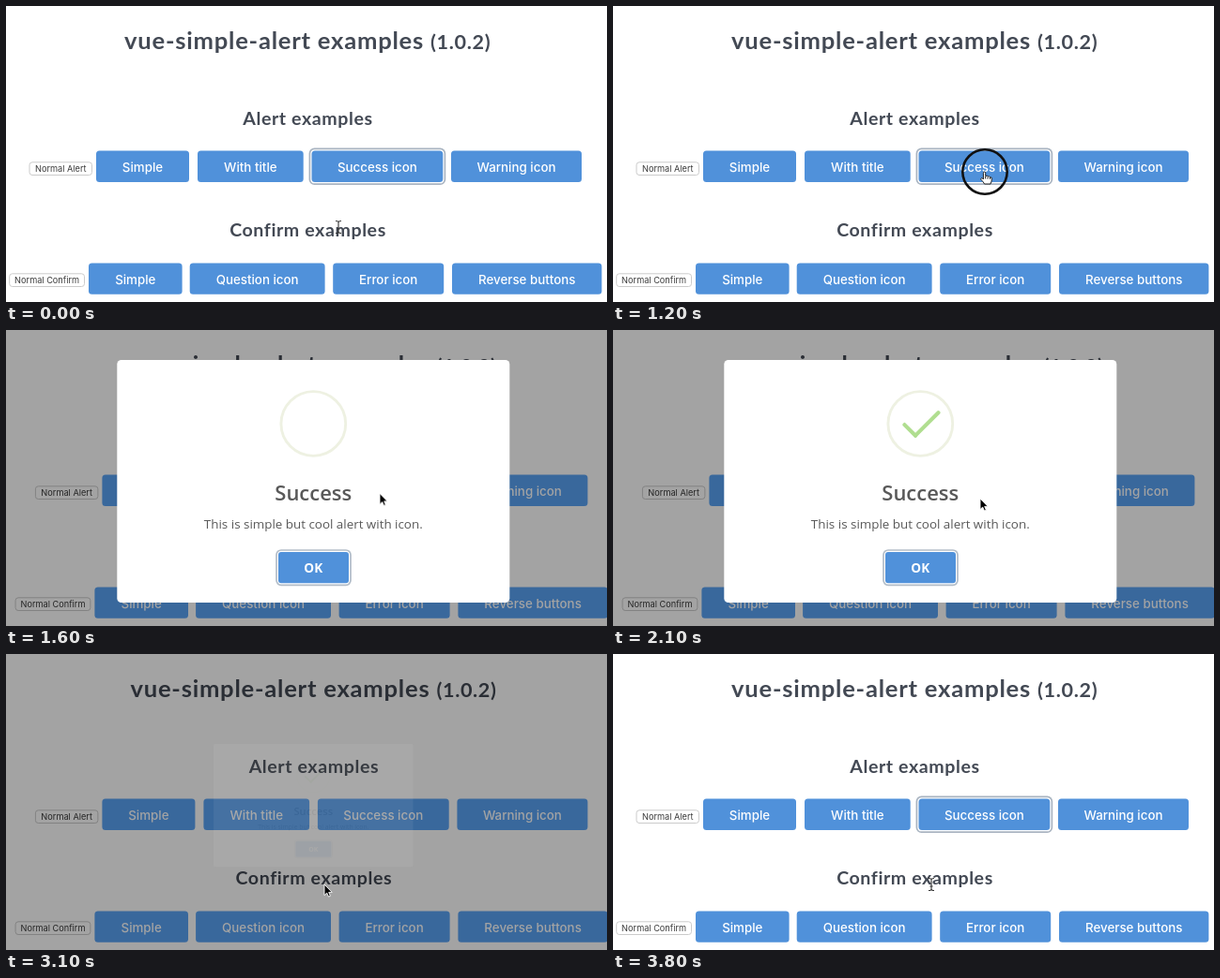
These frames come from a looping animation (640x316 px, 3900 ms). An HTML page:

```html
<!DOCTYPE html>
<html lang="en">
<head>
<meta charset="utf-8">
<title>Alert examples</title>
<style>
  html, body { margin: 0; width: 100%; height: 100%; overflow: hidden; background: #fff; }
  svg { display: block; width: 640px; height: 316px; }
  .head { font-family: Lato, sans-serif; font-weight: 700; fill: #434954; }
  .head text { font-variant-ligatures: none; letter-spacing: .03em; }
  .btn rect { fill: currentColor; }
  .btn text { font: 500 13.35px Inter, sans-serif; fill: #fff; text-anchor: middle; }
  .plain rect { fill: #fff; stroke: #cbcbcb; }
  .plain text { font: 400 9.2px Inter, sans-serif; fill: #3a3a3a; text-anchor: middle; }
  #modal { transform-origin: 327.3px 161.5px; }
  #modal text { font-family: "Open Sans", "Noto Sans", sans-serif; text-anchor: middle; fill: #595959; }
  #modal text.ok { font-weight: 700; fill: #fff; }
  .line { fill: #b0de90; transform-box: fill-box; transform-origin: center; }
  #tip { transform: rotate(45deg); }
  #long { transform: rotate(-45deg); }
</style>
</head>
<body>
<svg viewBox="0 0 640 316">
  <rect width="640" height="316" fill="#fff"/>
  <g id="page">
    <g class="head">
      <text x="126" y="46" font-size="25.6">vue-simple-alert examples</text>
      <text x="452" y="46" font-size="21.6">(1.0.2)</text>
      <g font-size="19.6" text-anchor="middle">
        <text x="321.5" y="126.7">Alert examples</text>
        <text x="321.5" y="246.2">Confirm examples</text>
      </g>
    </g>
    <g id="buttons"></g>
    <rect id="focus" x="323.4" y="152.4" width="144" height="37.8" rx="5" fill="none" stroke="#a9b4c1" stroke-width="1.7"/>
  </g>
  <rect id="shade" width="640" height="316" opacity=".36"/>
  <g id="modal">
    <rect x="118.3" y="32" width="418" height="259" rx="4.5" fill="#fff"/>
    <circle cx="327.3" cy="100" r="34.4" fill="none" stroke="#eef1e2" stroke-width="2.9"/>
    <g transform="translate(294.55 67.25) scale(13.1)">
      <rect id="tip" class="line" height=".3125" rx=".125"/>
      <rect id="long" class="line" height=".3125" rx=".125"/>
    </g>
    <text x="327.3" y="181.5" font-size="22" font-weight="600">Success</text>
    <text x="327.3" y="212" font-size="13.4">This is simple but cool alert with icon.</text>
    <rect id="ring" x="288" y="235" width="79" height="37.3" rx="5" fill="#fff" stroke-width="1.7"/>
    <rect id="ok" x="290" y="237" width="75" height="33.3" rx="3"/>
    <text class="ok" x="327.3" y="258.5" font-size="13.6">OK</text>
  </g>
  <g id="cursor">
    <circle id="press" r="23.7" fill="none" stroke="#111" stroke-width="2.6"/>
    <path id="arrow" d="M0 0V11.6L2.7 9.1 4.5 13.1 6.4 12.3 4.7 8.4H8.2Z" fill="#000" stroke="#fff" stroke-width=".9"/>
    <path id="hand" d="M-1.6 6V1.2Q-1.6 0-.5 0T.7 1.2V4.6Q2.6 3.6 3.1 5 5 4.2 5.5 5.8 7.4 5.4 7.4 7.2 7.4 10.2 6 13H-.4Q-1.6 10.8-4 8.4-4.6 7-3.4 6.6-2.4 6.6-1.6 8ZM.7 5V7.5M3.1 5.5V7.6M5.5 6V7.8" fill="#fff" stroke="#222" stroke-width="1"/>
    <path id="beam" d="M-3-6.5Q0-6.5 0-5 0-6.5 3-6.5M0-5V5M-3 6.5Q0 6.5 0 5 0 6.5 3 6.5M-1.6 2H1.6" fill="none" stroke="#333" stroke-width="1.1"/>
  </g>
</svg>
<script>
const LOOP = 3900, TICK = 100;
const OPEN = 1212, SHOW = 300, DRAW = 750, CLOSE = 2975, HIDE = 150;
const BLUE = '#5091da', GONE = CLOSE + HIDE;
const $ = id => document.getElementById(id);
const anims = [];

// Rows are [ms, properties, easing to the next row]; values hold by default.
function play(id, rows) {
  const all = [...rows];
  if (all[0][0] > 0) all.unshift([0, all[0][1]]);
  all.push([LOOP, all[all.length - 1][1]]);
  const frames = all.map(([ms, props, easing = 'step-end']) => ({ offset: ms / LOOP, easing, ...props }));
  const a = $(id).animate(frames, { duration: LOOP, fill: 'both' });
  a.pause();
  anims.push(a);
}

const toggle = (id, rows) =>
  play(id, rows.map(([ms, on]) => [ms, { visibility: on ? 'visible' : 'hidden' }]));

function button(cls, label, x1, x2, y, h, r, base) {
  const w = x2 - x1;
  return `<g class="${cls}"><rect x="${x1}" y="${y}" width="${w}" height="${h}" rx="${r}"/>` +
    `<text x="${x1 + w / 2}" y="${base}">${label}</text></g>`;
}
const row = (y, list) => list.map(([label, x1, x2]) => button('btn', label, x1, x2, y, 33.3, 3.5, y + 22.2)).join('');

$('buttons').innerHTML =
  button('plain', 'Normal Alert', 25, 91.5, 166.8, 13.7, 3, 177) +
  row(154.6, [['Simple', 96, 195], ['With title', 204, 316.7], ['Success icon', 325.5, 465.3], ['Warning icon', 474, 613]]) +
  button('plain', 'Normal Confirm', 3.7, 83.5, 285.8, 13.7, 3, 296) +
  row(274.4, [['Simple', 88, 187.6], ['Question icon', 195.7, 339.6], ['Error icon', 348.2, 466.2], ['Reverse buttons', 475, 634.4]]);

// The page moves aside while the scrollbar is hidden; its blue stays vivid under the shade.
const look = (x, color) => ({ transform: `translate(${x}px, 0px)`, color });
play('page', [[0, look(0, BLUE)], [OPEN, look(6.4, '#5aa3f5')], [GONE, look(0, BLUE)]]);
toggle('focus', [[0, 1], [OPEN, 0], [GONE, 1]]);
toggle('shade', [[0, 0], [OPEN, 1], [GONE, 0]]);

const pose = (scale, opacity) => ({ transform: `scale(${scale})`, opacity });
play('modal', [
  [0, pose(.7, 0)],
  [OPEN, pose(.7, 1), 'ease'],
  [OPEN + SHOW * .45, pose(1.05, 1), 'ease'],
  [OPEN + SHOW * .8, pose(.95, 1), 'ease'],
  [OPEN + SHOW, pose(1, 1)],
  [CLOSE, pose(1, 1), 'ease'],
  [GONE, pose(.5, .05)],
  [GONE + 1, pose(.5, 0)]
]);

// Check mark strokes, in icon units: [share of the drawing time, x, y, width].
const stroke = (id, steps) => play(id, steps.map(([k, x, y, w]) =>
  [OPEN + DRAW * k, { x: x + 'px', y: y + 'px', width: w + 'px' }, k < 1 ? 'ease' : 'step-end']));
stroke('tip', [[.54, .0625, 1.1875, 0], [.7, -.375, 2.1875, 3.125], [.84, 1.3125, 3, 1.0625], [1, .875, 2.875, 1.5625]]);
stroke('long', [[.65, 2.125, 3.375, 0], [.84, 1.5625, 2.1875, 3.4375], [1, 1.5625, 2.375, 2.9375]]);

play('ring', [[0, { stroke: '#93b9dc' }], [1400, { stroke: '#b3bdc8' }]]);
play('ok', [[0, { fill: BLUE }], [2500, { fill: '#4a85c9' }], [2800, { fill: '#457ab8' }], [3000, { fill: BLUE }]]);

const at = (x, y) => ({ transform: `translate(${x}px, ${y}px)` });
play('cursor', [
  [0, at(354, 236), 'ease-in-out'],
  [600, at(396, 177)],
  [1300, at(398, 174.5)],
  [1800, at(398, 174.5), 'ease-in-out'],
  [2100, at(391, 180), 'ease-in-out'],
  [2500, at(339, 246)]
]);
toggle('beam', [[0, 1], [200, 0], [3200, 1]]);
toggle('arrow', [[0, 0], [200, 1], [500, 0], [1300, 1], [2500, 0], [3000, 1], [3200, 0]]);
toggle('hand', [[0, 0], [500, 1], [1300, 0], [2500, 1], [3000, 0]]);
toggle('press', [[0, 0], [1100, 1], [1300, 0], [2800, 1], [3000, 0]]);

const start = performance.now();
function tick() {
  const t = Math.floor((performance.now() - start) / TICK) * TICK % LOOP;
  for (const a of anims) a.currentTime = t;
  requestAnimationFrame(tick);
}
tick();
</script>
</body>
</html>
```
